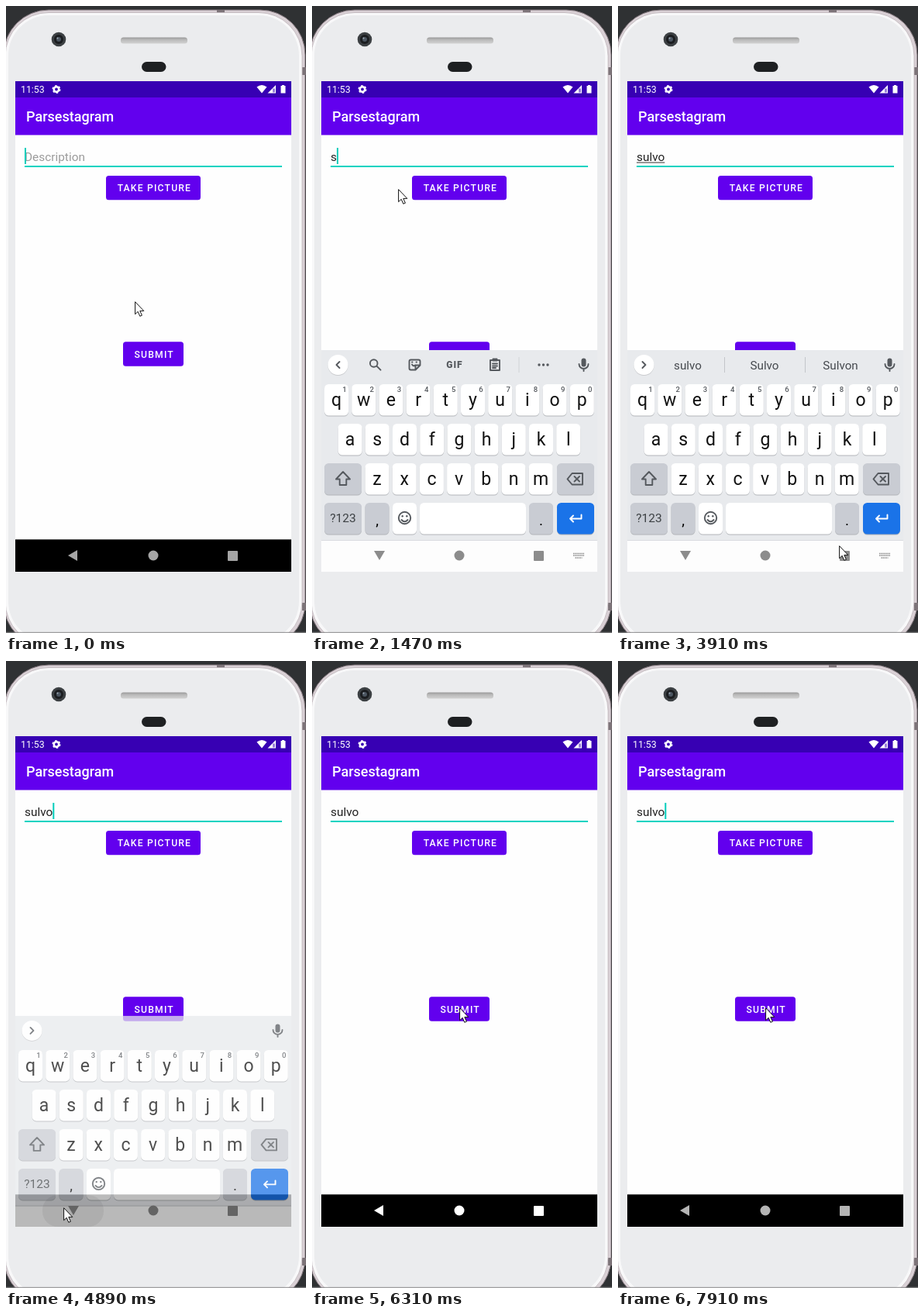
These frames come from a looping animation (387x809 px, 8000 ms). An HTML page:

```html
<!DOCTYPE html>
<html lang="en">
<head>
<meta charset="utf-8">
<title>Phone form</title>
<style>
  html, body { margin: 0; width: 100%; height: 100%; overflow: hidden; background: #2f3133; }
  svg { display: block; width: 100%; height: 100%; font-family: Roboto, sans-serif; }
  .mid { text-anchor: middle; }
  .button { font-size: 12.2px; font-weight: 500; letter-spacing: 1.18px; fill: #fff; }
  .line { fill: none; stroke: #55595e; stroke-width: 1.9; stroke-linecap: round; stroke-linejoin: round; }
  .gray { fill: #55595e; }
</style>
</head>
<body>
<svg viewBox="0 0 387 809">
  <defs>
    <linearGradient id="speaker" x2="0" y2="1">
      <stop offset="0" stop-color="#999"/><stop offset=".4" stop-color="#bbb"/><stop offset="1" stop-color="#d2d2d2"/>
    </linearGradient>
    <clipPath id="screen"><path d="M12 97h356v633H12z"/></clipPath>
  </defs>

  <!-- phone body -->
  <rect width="387" height="809" fill="#2f3133"/>
  <rect x="-3" y="5" width="389" height="823" rx="58" fill="#d9d0d5" stroke="#756a70"/>
  <path d="M272 5h10v4h-10zM382 79h5v10h-5zM382 770h5v10h-5z" fill="#7d7479"/>
  <rect x="-1" y="8.500" width="383" height="816" rx="56" fill="#f8f8f9" stroke="#bdb3b8" stroke-width=".8"/>
  <rect x="3" y="12" width="375" height="808" rx="52" fill="#ebecee"/>
  <path d="M0 808.300h387" stroke="#8b8b8d"/>
  <circle cx="68" cy="43" r="9.300" fill="#3c4043"/>
  <circle cx="68" cy="43" r="6" fill="#1b1d20"/>
  <circle cx="68" cy="43" r="3" fill="#4b5560"/>
  <circle cx="66.500" cy="41.500" r="1" fill="#a5b0ba"/>
  <rect x="148" y="40.500" width="86" height="8" rx="3.500" fill="url(#speaker)"/>
  <rect x="175" y="72" width="31.500" height="13" rx="6.500" fill="#1e2022"/>

  <g clip-path="url(#screen)">
    <rect x="12" y="97" width="356" height="633" fill="#fefefe"/>
    <rect x="12" y="97" width="356" height="21" fill="#3700b3"/>
    <rect x="12" y="118" width="356" height="48.500" fill="#6200ee"/>

    <!-- status bar -->
    <g fill="#fff">
      <text x="19" y="112" font-size="12.300">11:53</text>
      <circle cx="65" cy="107.500" r="3.200" fill="none" stroke="#fff" stroke-width="2.600"/>
      <circle cx="65" cy="107.500" r="4.700" fill="none" stroke="#fff" stroke-width="1.600" stroke-dasharray="2.46"/>
      <path d="M323.500 104.500Q330 99.500 336.500 104.500L330 112.500zM348 102v10.500h-10.500zM356 102h3v1h1.500v9.500h-6v-9.500h1.500z"/>
      <path d="M344 106.500v5h3v-5z" fill="#3700b3" opacity=".5"/>
      <text x="26" y="149" font-size="18" font-weight="500">Parsestagram</text>
    </g>

    <!-- form -->
    <text id="entry" x="24" y="200" font-size="15.400"></text>
    <rect id="entryLine" x="24" y="201.500" height="1" fill="#333"/>
    <rect x="24" y="206" width="332" height="2" fill="#03d3c1"/>
    <rect id="caret" y="183" width="2" height="21" fill="#03cdbb"/>
    <rect x="129" y="219" width="122" height="31.200" rx="3.500" fill="#6200ee"/>
    <text class="button" x="143.700" y="239">TAKE PICTURE</text>
    <rect id="submitShadow" x="150" y="435" width="80.500" height="33" rx="4" fill="#0003"/>
    <rect x="151" y="433.300" width="78" height="31.500" rx="3.500" fill="#6200ee"/>
    <rect id="submitInk" x="151" y="433.300" width="78" height="31.500" rx="3.500" fill="#fff"/>
    <text class="button" x="165.500" y="454">SUBMIT</text>
    <rect x="12" y="688.300" width="356" height="42"/>

    <!-- keyboard -->
    <g id="keyboard">
      <rect x="12" y="444" width="356" height="245" fill="#e8eaed"/>
      <rect x="12" y="689" width="356" height="42" fill="#fdfdfd"/>
      <path d="M12 689.500h356" stroke="#dadce0"/>
      <g id="keys"></g>
      <path class="line" d="M40 601l-9 9.500h4.700v7.500h8.600v-7.500h4.700z"/>
      <path class="line" d="M335.500 603h13.500v14.500h-13.500l-6-7.200zM338.500 607l6.500 6.500m0-6.500l-6.500 6.500"/>
      <g class="line"><circle cx="119.500" cy="660.500" r="7.700"/><path d="M115.500 663q4 4.500 8 0"/></g>
      <g class="gray"><circle cx="116.700" cy="658.200" r="1.200"/><circle cx="122.300" cy="658.200" r="1.200"/></g>
      <path class="line" style="stroke:#fff" d="M347.500 656.500v5H333m4-4l-4 4l4 4"/>
      <circle cx="33.500" cy="464" r="13" fill="#0002"/>
      <circle cx="33.500" cy="463" r="13" fill="#fff"/>
      <path id="chevron" class="line"/>
      <rect x="347.500" y="454.500" width="6" height="11" rx="3" class="gray"/>
      <path class="line" d="M344.500 462a6 6 0 0 0 12 0M350.500 468v3"/>
      <g id="tools">
        <g class="line">
          <circle cx="79.700" cy="461" r="4.800"/><path d="M83.500 464.700l5 5"/>
          <path d="M127.500 456.500h10a2 2 0 0 1 2 2v5l-6 6h-6a2 2 0 0 1-2-2v-9a2 2 0 0 1 2-2zM139 463.500h-5.500v5.500M129 462.500q2 3 4 1M129 459.500h.5m5 0h.5"/>
          <path d="M230 457h12v13h-12zM233.500 455.500h5v2h-5zM233 461.500h6m-6 3h6m-6 2.500h4"/>
        </g>
        <text class="mid gray" x="184" y="467" font-size="12" font-weight="900" letter-spacing="1">GIF</text>
        <path d="M267 453v20" stroke="#d0d3d7"/>
        <g class="gray"><circle cx="293" cy="463" r="1.700"/><circle cx="298.500" cy="463" r="1.700"/><circle cx="304" cy="463" r="1.700"/></g>
      </g>
      <g id="suggestions" class="mid" font-size="15.200" fill="#45494e">
        <text x="90" y="469"></text><text x="189" y="469"></text><text x="287" y="469"></text>
        <path d="M137.500 453v20M241.500 453v20" stroke="#c3c6ca"/>
      </g>
    </g>

    <!-- navigation bar -->
    <rect id="navInk" x="47" y="689" width="79" height="41" rx="20"/>
    <g id="nav">
      <path id="back" d="M80 709l12-7v14z"/>
      <circle cx="190" cy="709" r="6.500"/>
      <rect x="286" y="703" width="13" height="13" rx="1"/>
      <path id="imeIcon" d="M337 706.500h14M337 709h14M339.500 712h9" fill="none" stroke="#888" stroke-width="1.300" stroke-dasharray="1.4 .7"/>
    </g>
  </g>
  <path id="mouse" d="M.6.700v16l3.600-3.400 2.600 6 2.600-1.100-2.600-5.800h5z" fill="#fff" stroke="#111" stroke-linejoin="round"/>
</svg>

<script>
const LOOP = 8000;
const BLINK = 530;
const FIRST_KEY = 1470;
const CLOSE = 4720;
const WORD = "sulvo", CAPITAL = "Sulvo", LONGER = "Sulvon";
const keyTimes = [...WORD].map((_, i) => i ? 1570 + 180 * i : FIRST_KEY);

const mouseStart = { x: 166, y: 381 };
const mouseMoves = [
  { start: 100, end: 270, x: 111, y: 236 },
  { start: 2650, end: 3250, x: 345, y: 663 },
  { start: 3380, end: 3900, x: 285, y: 696 },
  { start: 4040, end: 4440, x: 74, y: 705 },
  { start: 5400, end: 6300, x: 190, y: 447 }
];

const $ = id => document.getElementById(id);
const show = (id, opacity) => $(id).setAttribute("opacity", +opacity);
const progress = (time, start, end) => Math.min(1, Math.max(0, (time - start) / (end - start)));
const mix = (a, b, amount) => a + (b - a) * amount;
const easeOut = p => 1 - (1 - p) ** 2;
const pulse = (time, start, end) => Math.sin(Math.PI * progress(time, start, end));

function key(x, y, width, label = "", fill = "#fff", size = 23) {
  return `<rect x="${x}" y="${y + 1}" width="${width}" height="40.500" rx="5.500" fill="#b3b6ba"/>
    <rect x="${x}" y="${y}" width="${width}" height="40.500" rx="5.500" fill="${fill}"/>
    <text class="mid" x="${x + width / 2}" y="${y + 19.400 + size * .36}" font-size="${size}" fill="${size < 20 ? "#3c4043" : "#111"}">${label}</text>`;
}

function buildKeys() {
  const special = "#c9ccd3";
  let markup = "";
  [["qwertyuiop", 16], ["asdfghjkl", 33.600], ["zxcvbnm", 68.500]].forEach(([row, left], rowIndex) => {
    [...row].forEach((letter, i) => {
      const x = left + i * 35.2;
      markup += key(x, 488 + rowIndex * 51, 31, letter);
      if (rowIndex === 0)
        markup += `<text class="mid gray" x="${x + 26}" y="498" font-size="9.500" font-weight="500">${(i + 1) % 10}</text>`;
    });
  });
  markup += key(16, 590, 48, "", special) + key(316, 590, 48, "", special)
    + key(16, 641, 48, "?123", special, 15.5) + key(68.5, 641, 31, "", special)
    + key(104, 641, 31) + key(139, 641, 137) + key(280, 641, 31, "", special)
    + key(316, 641, 48, "", "#1a73e8")
    + '<text class="mid" x="84" y="669.500" font-size="19">,</text><text class="mid" x="295.500" y="669.500" font-size="19">.</text>';
  $("keys").innerHTML = markup;
}

function drawMouse(time) {
  let { x, y } = mouseStart;
  for (const move of mouseMoves) {
    const amount = easeOut(progress(time, move.start, move.end));
    x = mix(x, move.x, amount);
    y = mix(y, move.y, amount);
  }
  $("mouse").setAttribute("transform", `translate(${x} ${y})`);
}

function drawKeyboard(time) {
  const enter = progress(time, 100, 560);
  const leave = progress(time, 4800, 5140);
  $("keyboard").setAttribute("transform", `translate(0 ${30 * (1 - enter + easeOut(leave))})`);
  show("keyboard", Math.min(1, enter * 3) - leave);

  const restore = progress(time, 4890, 5250);
  const dim = progress(time, 7300, 7910);
  const level = leave ? mix(100, 255, restore) - 75 * dim : mix(165, 140, enter);
  $("nav").setAttribute("fill", `rgb(${level},${level},${level})`);
  $("back").setAttribute("transform", `rotate(${-90 * enter ** 2 * (1 - restore)} 86.500 708.500)`);
  show("imeIcon", enter > .3 && !leave);
  show("navInk", .06 * pulse(time, 4650, 5140));
}

function drawEntry(time) {
  const typed = WORD.slice(0, keyTimes.filter(pressed => pressed <= time).length);
  const entry = $("entry");
  entry.textContent = typed || "Description";
  entry.setAttribute("fill", typed ? "#212121" : "#9b9b9b");
  const width = typed ? entry.getComputedTextLength() : 0;
  $("entryLine").setAttribute("width", width);
  show("entryLine", typed.length > 1 && time < CLOSE);

  // Every input restarts the blinking.
  const lastInput = [0, ...keyTimes, CLOSE].findLast(start => start <= time);
  $("caret").setAttribute("x", 24 + width);
  show("caret", Math.floor((time - lastInput) / BLINK) % 2 === 0);

  const suggesting = typed.length > 1;
  show("tools", !suggesting);
  show("suggestions", suggesting && time < CLOSE);
  const words = [typed, CAPITAL.slice(0, typed.length), LONGER];
  document.querySelectorAll("#suggestions text").forEach((node, i) => node.textContent = words[i]);
  $("chevron").setAttribute("d", suggesting ? "M31.500 459l4 4-4 4" : "M35.500 459l-4 4 4 4");
}

function draw(time) {
  drawMouse(time);
  drawKeyboard(time);
  drawEntry(time);
  const press = pulse(time, 6700, 6950);
  show("submitInk", .22 * press);
  show("submitShadow", press);
}

function frame() {
  draw(performance.now() % LOOP);
  requestAnimationFrame(frame);
}

buildKeys();
frame();
</script>
</body>
</html>
```
